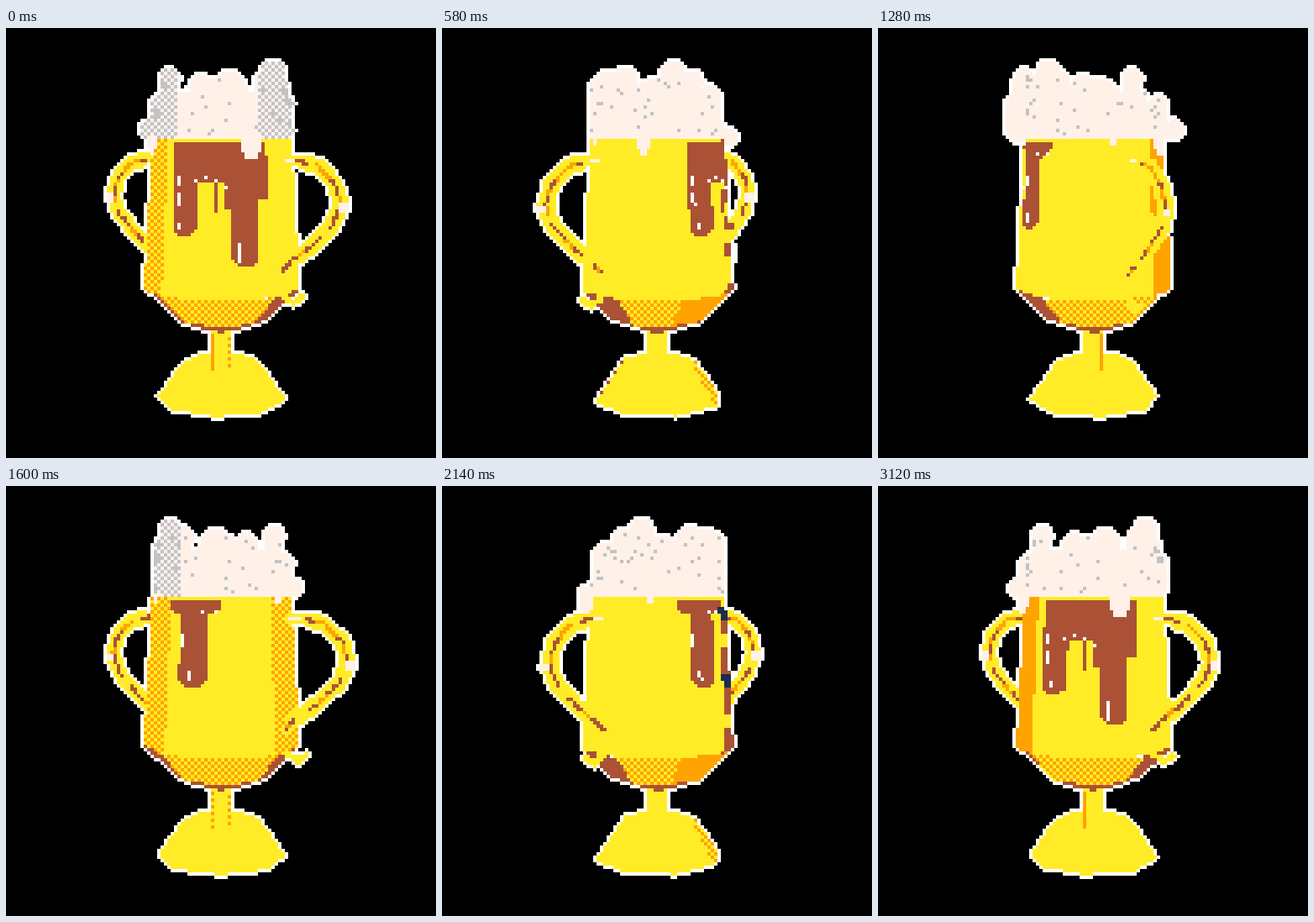
Write an HTML page with a canvas that moves like this. It is 512 px wide and 512 px high and loops after 3140 ms.

```html
<!DOCTYPE html>
<html lang="en">
<head>
<meta charset="utf-8">
<title>Spinning cup</title>
<style>
html, body { margin: 0; width: 100%; height: 100%; overflow: hidden; background: #000; }
canvas { display: block; width: 100vw; height: 100vh; image-rendering: pixelated; }
</style>
</head>
<body>
<canvas id="stage" width="128" height="128"></canvas>
<script>
// Geometry is in stage pixels (512 wide); the picture is rastered in cells of 4.
const N = 128, CELL = 4, CX = 257, HORIZON = 125, PERSPECTIVE = 0.0009;
const DEG = Math.PI / 180, FACET = 45 * DEG, STEP_MS = 20, STEPS = 157;
const EMPTY = 0, YELLOW = 1, ORANGE = 2, BROWN = 3, FOAM = 4, GRAY = 5, INDIGO = 6, NAVY = 7, WHITE = 8;
const PALETTE = [[0, 0, 0], [255, 236, 39], [255, 163, 0], [171, 82, 54], [255, 241, 232],
  [194, 195, 199], [131, 118, 156], [29, 43, 83], [255, 255, 255]];

const ctx = document.getElementById("stage").getContext("2d");
const image = ctx.createImageData(N, N);
const grid = new Uint8Array(N * N);
let turn = 0;

const hash = n => { const v = Math.sin(n * 12.9898 + 4.1) * 43758.5453; return v - Math.floor(v); };
const clamp = (v, lo, hi) => Math.min(hi, Math.max(lo, v));
const mix = (a, b) => (i, j) => (i + j) & 1 ? a : b;
const cell = v => Math.floor(v / CELL);
const mid = i => i * CELL + CELL / 2;

function put(i, j, color) {
  if (i < 0 || j < 0 || i >= N || j >= N) return;
  grid[j * N + i] = typeof color === "function" ? color(i, j) : color;
}

const dot = (x, y, color) => put(cell(x), cell(y), color);

function rect(x0, y0, x1, y1, color) {
  for (let j = cell(y0); mid(j) < y1; j++)
    for (let i = cell(x0); mid(i) < x1; i++) put(i, j, color);
}

function disc(x, y, r, color) {
  for (let j = cell(y - r); j <= cell(y + r); j++)
    for (let i = cell(x - r); i <= cell(x + r); i++)
      if (Math.hypot(mid(i) - x, mid(j) - y) <= r) put(i, j, color);
}

function column(x, y0, y1, r, color) {
  disc(x, y0, r, color);
  rect(x - r + 2, y0, x + r - 2, y1, color);
  disc(x, y1, r, color);
}

function poly(points, color) {
  const ys = points.map(p => p[1]);
  for (let j = cell(Math.min(...ys)); j <= cell(Math.max(...ys)); j++) {
    const y = mid(j), cuts = [];
    points.forEach(([ax, ay], k) => {
      const [bx, by] = points[(k + 1) % points.length];
      if ((ay <= y) !== (by <= y)) cuts.push(ax + (y - ay) / (by - ay) * (bx - ax));
    });
    cuts.sort((a, b) => a - b);
    for (let k = 0; k + 1 < cuts.length; k += 2)
      for (let i = cell(cuts[k]); mid(i) <= cuts[k + 1]; i++)
        if (mid(i) >= cuts[k]) put(i, j, color);
  }
}

// Angles passed here already include the turn.
function project(angle, r, h) {
  const s = 1 / (1 - PERSPECTIVE * r * Math.cos(angle));
  return [CX + r * Math.sin(angle) * s, HORIZON + h * s, s];
}

const edgeAngle = k => turn - 5 * DEG + k * FACET;
const ring = (r, h) => Array.from({ length: 8 }, (_, k) => project(edgeAngle(k), r, h));

function facetAt(angle) {
  const k = Math.floor((angle - edgeAngle(0)) / FACET);
  const center = edgeAngle(k + 0.5);
  return { id: ((k % 8) + 8) % 8, center, c: Math.cos(center) };
}

const facets = () => Array.from({ length: 8 }, (_, id) => {
  const center = edgeAngle(id + 0.5);
  return { id, center, c: Math.cos(center), side: Math.sign(Math.sin(center)) };
}).sort((a, b) => a.c - b.c);

function band(top, bottom, id, color) {
  const next = (id + 1) % 8;
  poly([top[id], top[next], bottom[next], bottom[id]], color);
}

// Foam lumps: x and z around the axis, height of the centre, radius.
const LUMPS = [
  [61, -7, 53, 14], [63, -7, 72, 17], [-62, -11, 60, 12], [10, -68, 70, 19], [-25, -62, 70, 14],
  [52, -70, 63, 14], [61, 18, 64, 13], [55, 43, 82, 14], [0, 0, 95, 36], [72, -58, 90, 13],
  [-75, 25, 92, 12], [-86, 42, 121, 12], [30, 78, 129, 11]
];
const BUBBLES = Array.from({ length: 74 }, (_, n) => [hash(n) * 2 * Math.PI, 58 + hash(n + 200) * 70]);

function drawFoam() {
  for (const [x, z, y, r] of LUMPS)
    column(CX + x * Math.cos(turn) + z * Math.sin(turn), y, Math.max(y, 122), r, FOAM);
  rect(CX - 64, 76, CX + 64, 134, FOAM);
  rect(CX - 78, 112, CX + 78, 134, FOAM);

  const isFoam = (i, j) => grid[j * N + i] === FOAM;
  for (let j = 8; j < 36; j++)
    for (let i = 30; i < 98; i++) {
      if (!isFoam(i, j)) continue;
      const f = facetAt(Math.asin(clamp((mid(i) - CX) / 70, -0.98, 0.98)));
      if (f.id !== 5 && f.c > 0.29 && f.c < 0.47) put(i, j, mix(GRAY, FOAM));
    }
  for (const [a, y] of BUBBLES) {
    const i = cell(CX + 80 * Math.sin(a + turn)), j = cell(y);
    if (Math.cos(a + turn) > 0 && isFoam(i, j)) put(i, j, GRAY);
  }
  for (const f of facets())
    if (f.c > 0 && f.c < 0.095) {
      const i = cell(CX + 62 * Math.sin(f.center - f.side * FACET / 2));
      for (let j = 15; j < 33; j++) if (isFoam(i, j)) put(i, j, INDIGO);
    }
}

function drawFoot() {
  const top = ring(46, 273), rim = ring(76, 315);
  poly(rim, YELLOW);
  for (const f of facets()) {
    let color = YELLOW;
    if (f.c < 0.2 && f.c > 0) color = mix(YELLOW, ORANGE);
    else if (f.c <= 0 && f.c > -0.1) color = ORANGE;
    else if (f.c <= -0.1 && f.c > -0.2) color = BROWN;
    band(top, rim, f.id, color);
  }
  poly(top, YELLOW);
}

function drawStem() {
  rect(244, 356, 268, 408, YELLOW);
  for (const f of facets()) {
    if (f.c < 0.2 || f.c > 0.47) continue;
    const x = f.side < 0 ? 246 : 266;
    for (let j = 91; j < 102; j++)
      put(cell(x), j, f.c > 0.32 ? mix(YELLOW, ORANGE) : ORANGE);
  }
}

// Syrup runs: middle angle, half width (degrees), lower end.
const RUNS = [[-2, 39, 184], [-30, 11.5, 247], [18, 11, 283], [33, 6, 206], [-5, 1.5, 222],
  [5, 4, 216], [153, 23, 154], [153, 12, 239]];
// Glints on the syrup: angle, top, bottom.
const GLINTS = [[-37, 176, 186], [-37, 198, 210], [-34, 232, 236], [14, 256, 276], [-22, 180, 182],
  [-14, 178, 181], [-5, 180, 183], [4, 188, 191], [143, 176, 190], [150, 222, 232],
  [160, 150, 153], [172, 148, 151]];

function syrupEnd(a) {
  let end = 0;
  for (const [center, half, y] of RUNS) {
    const u = (a - center) / half;
    if (Math.abs(u) <= 1) end = Math.max(end, y - 10 * u ** 4);
  }
  return end;
}

function wallColor(f, i, j) {
  if (f.c > 0.44) return YELLOW;
  if (f.c > 0.29) return mix(YELLOW, ORANGE)(i, j);
  if (f.c > 0.15) return ORANGE;
  const n = hash((j >> 2) + f.id * 17);
  return n < 0.4 ? YELLOW : n < 0.85 ? BROWN : NAVY;
}

const wallRadius = y => 83 + (y - 132) / 176 * 10;

function drawWall() {
  const sines = Array.from({ length: 8 }, (_, k) => Math.sin(edgeAngle(k)));
  const lo = Math.min(...sines), hi = Math.max(...sines);
  for (let j = 33; j < 82; j++) {
    const y = mid(j), r = wallRadius(Math.min(y, 308));
    for (let i = 36; i < 94; i++) {
      const u = (mid(i) - CX) / r;
      if (u < lo || u > hi) continue;
      const angle = Math.asin(clamp(u, -1, 1));
      if (y > 308 + 17 * Math.cos(angle)) continue;
      const a = ((angle - turn) / DEG + 900) % 360 - 180;
      put(i, j, y >= 136 && y < syrupEnd(a) ? BROWN : wallColor(facetAt(angle), i, j));
    }
  }
  for (const [a, y0, y1] of GLINTS) {
    const angle = a * DEG + turn;
    if (Math.cos(angle) < 0.15) continue;
    for (let y = y0; y <= y1; y += CELL) dot(CX + wallRadius(y) * Math.sin(angle), y, WHITE);
  }
}

function drawBowl() {
  const top = ring(93, 184), low = ring(57, 219), neck = ring(16, 234);
  for (const f of facets()) {
    if (f.c < -0.1) continue;
    const tilt = Math.acos(f.c) / DEG;
    band(low, neck, f.id, BROWN);
    band(top, low, f.id, tilt < 33 ? mix(YELLOW, ORANGE) : tilt < 45 ? ORANGE : BROWN);
  }
}

function drawFoamDrops() {
  for (const [a, half, end] of [[-78, 7, 154], [25, 12, 155], [-130, 4, 142], [110, 4, 142]]) {
    const angle = a * DEG + turn;
    if (Math.cos(angle) < 0) continue;
    const x = CX + 84 * Math.sin(angle), w = half * (0.5 + 0.5 * Math.cos(angle));
    rect(x - w, 128, x + w, end - 8, FOAM);
    rect(x - w * 0.6, end - 8, x + w * 0.6, end, FOAM);
  }
}

// Handle centre line: distance from axis, drop below the horizon.
const HANDLE = [[82, 31], [98, 32], [122, 37], [143, 57], [150, 80], [140, 103], [114, 129], [90, 147], [78, 159]];
const TAIL = [[80, 188], [92, 195], [103, 187]];
const HANDLES = [{ angle: 62.5 * DEG, scale: 1, seed: 3 }, { angle: 242 * DEG, scale: 1.04, seed: 61 }];

function along(path, parts, visit) {
  for (let n = 0; n <= (path.length - 1) * parts; n++) {
    const k = Math.min(Math.floor(n / parts), path.length - 2), t = n / parts - k;
    const [r0, h0] = path[k], [r1, h1] = path[k + 1];
    visit(r0 + (r1 - r0) * t, h0 + (h1 - h0) * t, n);
  }
}

function drawHandle({ angle, scale, seed }) {
  const a = angle + turn, at = (r, h) => project(a, r * scale, h);
  along(HANDLE, 10, (r, h, n) => {
    const [x, y, s] = at(r, h);
    disc(x, y, (n < 14 || n > 74 ? 6 : 9) * s, YELLOW);
  });
  along(TAIL, 8, (r, h) => {
    const [x, y] = at(r, h);
    disc(x, y, 4, YELLOW);
  });
  along(HANDLE, 10, (r, h, n) => {
    const [x, y] = at(r, h), v = hash((n >> 2) + seed);
    if (n < 8) dot(x, y, FOAM);
    else if (v < 0.52) dot(x, y, BROWN);
    else if (v < 0.8) dot(x, y, ORANGE);
  });
  const [tx, ty] = at(154, 84);
  rect(tx - 4, ty - 4, tx + 4, ty + 4, FOAM);
}

function present() {
  const solid = (i, j) => i >= 0 && j >= 0 && i < N && j < N && grid[j * N + i] !== EMPTY;
  for (let j = 0; j < N; j++)
    for (let i = 0; i < N; i++) {
      const n = j * N + i;
      const rim = !grid[n] && (solid(i - 1, j) || solid(i + 1, j) || solid(i, j - 1) || solid(i, j + 1));
      image.data.set(PALETTE[rim ? WHITE : grid[n]], n * 4);
      image.data[n * 4 + 3] = 255;
    }
  ctx.putImageData(image, 0, 0);
}

function draw(step) {
  turn = step * 0.04;
  grid.fill(EMPTY);
  const isFront = h => Math.cos(h.angle + turn) > 0;
  HANDLES.filter(h => !isFront(h)).forEach(drawHandle);
  drawFoam();
  drawFoot();
  drawStem();
  drawWall();
  drawBowl();
  drawFoamDrops();
  HANDLES.filter(isFront).forEach(drawHandle);
  present();
}

const start = performance.now();
let shown = -1;
function tick() {
  const step = Math.floor((performance.now() - start) / STEP_MS) % STEPS;
  if (step !== shown) draw(shown = step);
  requestAnimationFrame(tick);
}
tick();
</script>
</body>
</html>
```
